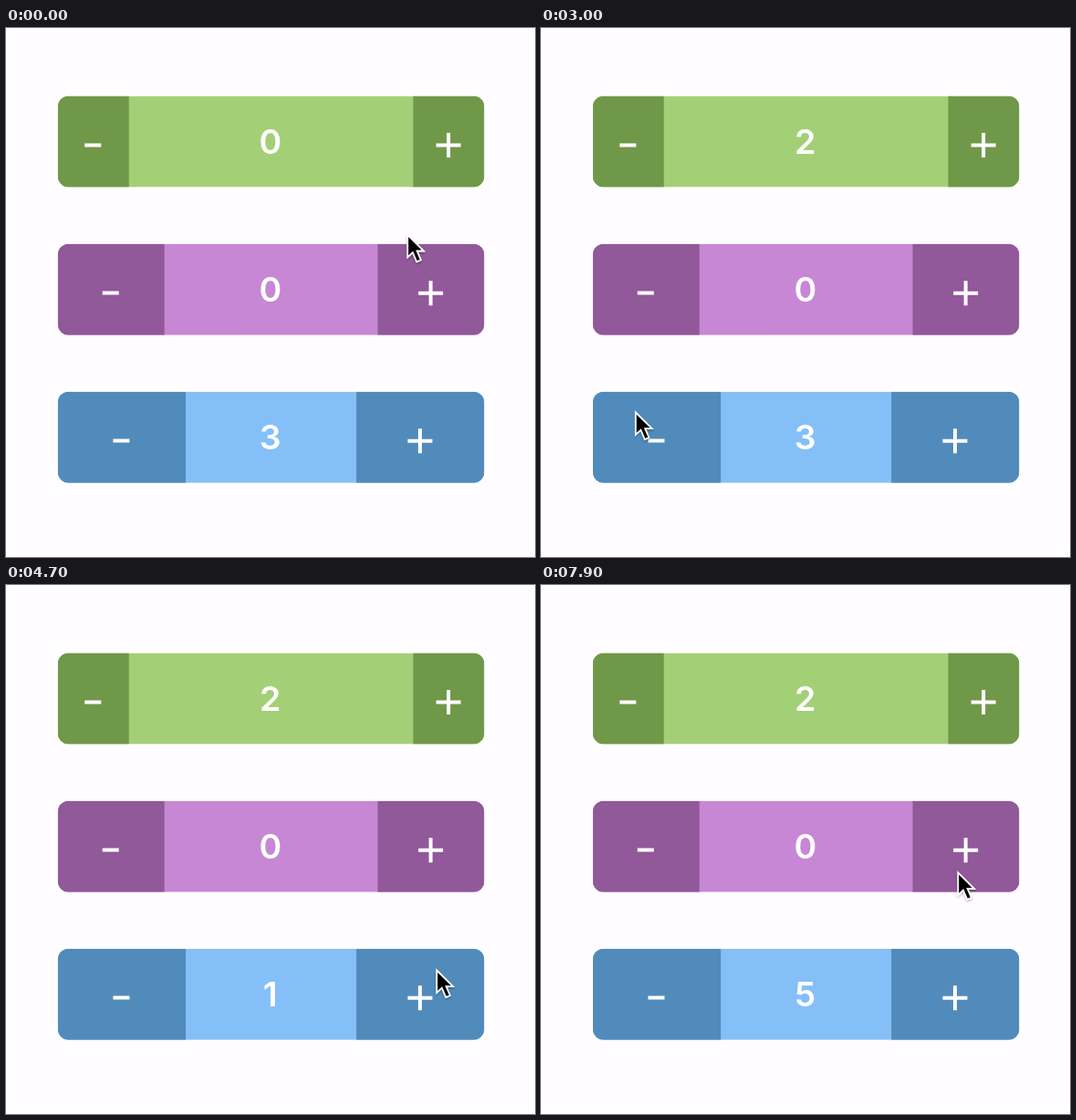
An HTML page that plays this animation: 580x580 px, repeating every 8000 ms.

```html
<!DOCTYPE html>
<html lang="en">
<head>
<meta charset="utf-8">
<title>Number steppers</title>
<style>
  html, body { margin: 0; width: 100%; height: 100%; overflow: hidden; background: #fffdff; }
  svg { display: block; width: 100vw; height: 100vh; }
  text { font: 600 37.5px Inter, Roboto, sans-serif; fill: #fff; text-anchor: middle; }
  .sign { fill: none; stroke: #fff; stroke-width: 4; }
</style>
</head>
<body>
<svg viewBox="0 0 580 580">
  <defs>
    <clipPath id="round"><rect x="56.8" width="467.6" height="100" rx="12"/></clipPath>
    <filter id="shadow" x="-50%" y="-50%" width="200%" height="200%">
      <feDropShadow dx="0" dy="1.5" stdDeviation="1.2" flood-opacity=".3"/>
    </filter>
  </defs>
  <g id="rows"></g>
  <path id="cursor" filter="url(#shadow)" stroke="#fff" stroke-width="1.8"
    d="M.8 .8V25.3L6.4 20L10.8 30.3L15.4 28.3L11.1 18.5H18.6Z"/>
</svg>
<script>
const LOOP = 8000, STEP = 100, HOLD = 100;
const LEFT = 56.8, WIDTH = 467.6, HEIGHT = 100, TOP = 74.6, GAP = 162.1;

// side: button width as a share of the row; less, more: tap times
const rows = [
  { side: 1 / 6, dark: '#709849', light: '#a3d076', value: 0, less: [], more: [1900, 2300] },
  { side: 1 / 4, dark: '#91589a', light: '#c787d4', value: 0, less: [], more: [] },
  { side: 0.3, dark: '#518bbb', light: '#85bff7', value: 3,
    less: [3200, 3500], more: [5800, 6100, 6400, 6900] }
];

// pointer moves; bend is the control point of a curved one
const home = [439.5, 226];
const moves = [
  { from: 0, to: 1800, end: [474, 101], bend: [581, 150] },
  { from: 2400, to: 3000, end: [103, 420.7] },
  { from: 3600, to: 4100, end: [102, 295] },
  { from: 4100, to: 4600, end: [471.5, 421.7], bend: [418, 235] },
  { from: 5400, to: 5900, end: [471.5, 443.5] },
  { from: 7100, to: 7700, end: [456.5, 314.5] }
];

function add(parent, tag, attrs) {
  const el = document.createElementNS('http://www.w3.org/2000/svg', tag);
  for (const key in attrs) el.setAttribute(key, attrs[key]);
  return parent.appendChild(el);
}

function build(row, i) {
  const g = add(document.getElementById('rows'), 'g', { transform: `translate(0 ${TOP + i * GAP})` });
  const box = add(g, 'g', { 'clip-path': 'url(#round)' });
  const part = (x, width, fill) => add(box, 'rect', { x, width, height: HEIGHT, fill });
  const side = row.side * WIDTH, right = LEFT + WIDTH - side;
  part(LEFT, WIDTH, row.light);
  row.minus = part(LEFT, side, row.dark);
  row.plus = part(right, side, row.dark);
  const a = LEFT + side / 2 - .5, b = right + side / 2 - .3;
  add(g, 'path', { class: 'sign', d: `M${a - 9} 53.8h18M${b - 13.5} 54h27M${b} 40.5v27` });
  row.label = add(g, 'text', { x: 289.8, y: 63.7 });
}

function pointer(t) {
  let pos = home;
  for (const { from, to, end, bend } of moves) {
    if (t < from) break;
    const k = Math.min(1, (t - from) / (to - from));
    const u = (1 - Math.cos(Math.PI * k)) / 2;
    const start = pos;
    pos = end.map((e, i) => {
      const c = bend ? bend[i] : (start[i] + e) / 2;
      return (1 - u) ** 2 * start[i] + 2 * u * (1 - u) * c + u * u * e;
    });
  }
  return pos;
}

function draw(t) {
  const done = taps => taps.filter(s => t >= s + HOLD).length;
  const shade = taps => taps.some(s => t >= s && t < s + HOLD) ? .75 : 1;
  for (const row of rows) {
    row.label.textContent = row.value + done(row.more) - done(row.less);
    row.minus.setAttribute('opacity', shade(row.less));
    row.plus.setAttribute('opacity', shade(row.more));
  }
  cursor.setAttribute('transform', `translate(${pointer(t)})`);
}

const cursor = document.getElementById('cursor');
rows.forEach(build);

const begin = performance.now();
function tick() {
  const t = (performance.now() - begin) % LOOP;
  draw(Math.floor(t / STEP) * STEP);
  requestAnimationFrame(tick);
}
tick();
</script>
</body>
</html>
```
